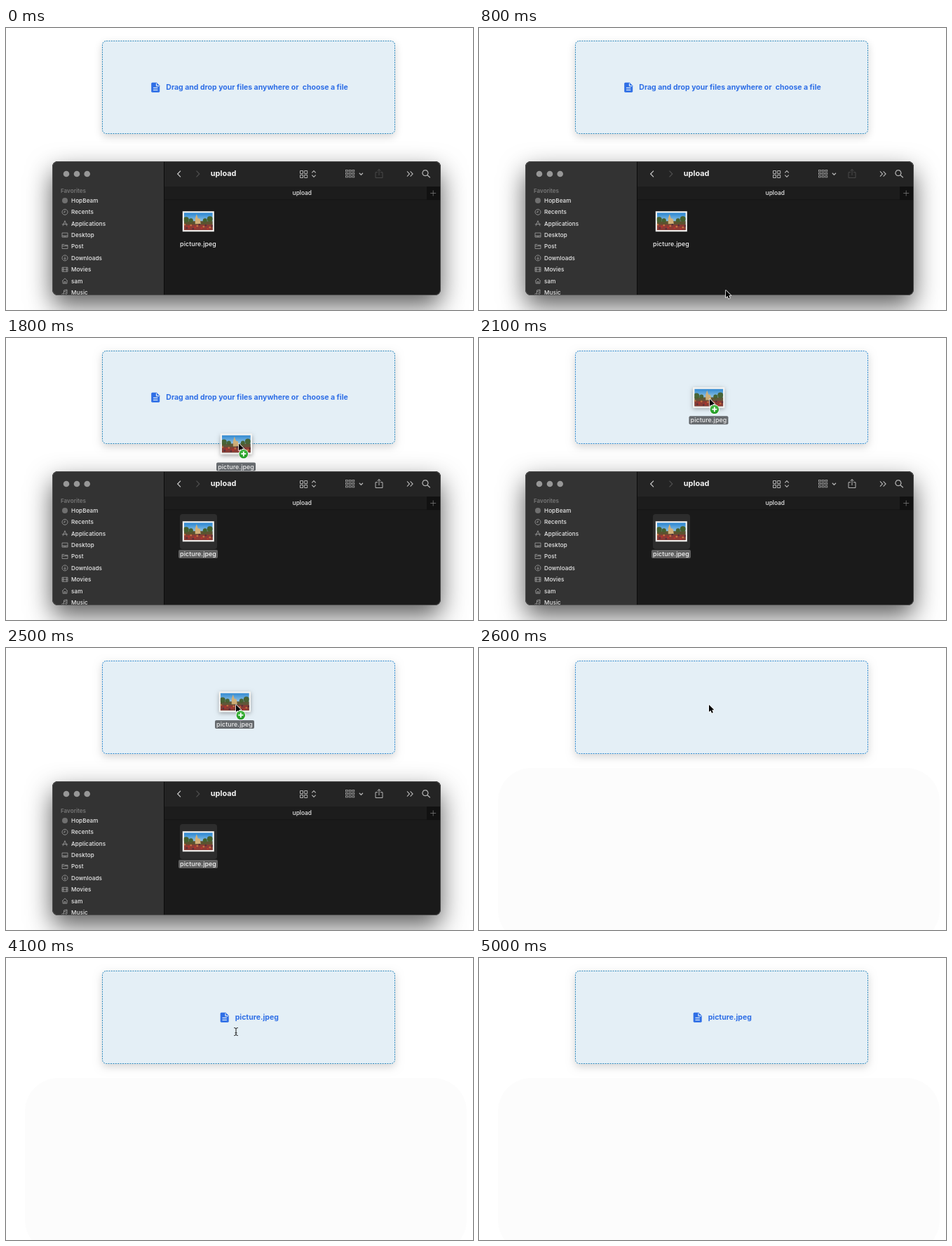
Recreate the animation shown at these times as an HTML page with a canvas. Size 666 by 402 pixels, loop 6100 ms.

```html
<!DOCTYPE html>
<html lang="en">
<head>
<meta charset="utf-8">
<title>Drag and drop upload</title>
<style>
html, body { margin: 0; width: 100%; height: 100%; overflow: hidden; background: #fff; }
canvas { display: block; width: 666px; height: 402px; }
</style>
</head>
<body>
<canvas id="stage"></canvas>
<script>
const W = 666, H = 402, LOOP = 6100, STEP = 100;
const FONT = 'Inter, Roboto, sans-serif';
const BLUE = '#2f6fe6';
const GRAB = [276, 280];
const GHOST_LAG = 15;
const canvas = document.getElementById('stage');
const c = canvas.getContext('2d');
const ratio = window.devicePixelRatio || 1;
canvas.width = W * ratio;
canvas.height = H * ratio;

// Pointer tip over time: [ms, x, y]
const ENTER = [[800, 352, 374], [900, 330, 346], [1000, 304, 312], [1100, 285, 289], [1200, ...GRAB]];
const DRAG = [[1400, ...GRAB], [1500, 282, 261], [1600, 299, 223], [1700, 319, 183], [1800, 332, 150.5],
  [1900, 334, 122], [2000, 332, 102], [2100, 329, 87], [2200, 328, 81]];
const LEAVE = [[4100, 328, 105], [4200, 345, 175], [4300, 373, 250], [4400, 400, 291], [4800, 400, 291], [4900, 408, 349]];
const PATH = [...ENTER, ...DRAG, [4000, 328, 81], ...LEAVE];

function pointerAt(t) {
  let i = PATH.findIndex(p => p[0] > t);
  if (i < 0) i = PATH.length - 1;
  const [t0, x0, y0] = PATH[i - 1], [t1, x1, y1] = PATH[i];
  const k = Math.min(1, (t - t0) / (t1 - t0));
  return [x0 + (x1 - x0) * k, y0 + (y1 - y0) * k];
}

function rect(x, y, w, h, fill, r = 0) {
  c.beginPath();
  c.roundRect(x, y, w, h, r);
  c.fillStyle = fill;
  c.fill();
}

function disc(x, y, r, fill) {
  c.beginPath();
  c.arc(x, y, r, 0, Math.PI * 2);
  c.fillStyle = fill;
  c.fill();
}

function poly(points, fill) {
  c.beginPath();
  for (let i = 0; i < points.length; i += 2) c.lineTo(points[i], points[i + 1]);
  c.closePath();
  c.fillStyle = fill;
  c.fill();
}

function stroke(d, color, width = 1) {
  c.strokeStyle = color;
  c.lineWidth = width;
  c.stroke(new Path2D(d));
}

function text(s, x, y, size, weight, color, align = 'left', spacing = 0) {
  c.font = `${weight} ${size}px ${FONT}`;
  c.letterSpacing = spacing + 'px';
  c.textAlign = align;
  c.textBaseline = 'alphabetic';
  c.fillStyle = color;
  c.fillText(s, x, y);
}

function shadow(color, blur, dy) {
  c.shadowColor = color;
  c.shadowBlur = blur * ratio;
  c.shadowOffsetY = dy * ratio;
}

function docIcon(x) {
  c.save();
  c.translate(x, 77.7);
  c.fillStyle = BLUE;
  c.fill(new Path2D('M1.5 0H7.6L12 4.5V12.6Q12 14 10.6 14H1.4Q0 14 0 12.6V1.5Q0 0 1.5 0Z'));
  stroke('M7.3 1V5H11.2M2.8 7.7H9.2M2.8 10.6H9.2', '#e4eff6', 1.2);
  c.restore();
}

function dropZone(t) {
  c.save();
  shadow('rgba(0,0,0,.17)', 12, 4);
  rect(137, 18, 418, 133, '#e4eff6', 6);
  c.restore();
  c.save();
  c.setLineDash([2, 1.4]);
  c.beginPath();
  c.roundRect(137.5, 18.5, 417, 132, 5.5);
  c.strokeStyle = t >= 1900 && t < 2700 ? '#2f8ad0' : '#2f89bd';
  c.lineWidth = 1;
  c.stroke();
  c.restore();
  if (t < 1900) {
    docIcon(207.2);
    text('Drag and drop your files anywhere or', 228.3, 88.2, 10.5, 700, BLUE);
    text('choose a file', 422.8, 88.2, 10.5, 700, BLUE);
  } else if (t >= 2700) {
    docIcon(305.7);
    text('picture.jpeg', 326.7, 88.2, 10.5, 700, BLUE);
  }
}

// Flat landscape thumbnail, centred on x, y
function thumb(x, y) {
  c.save();
  c.translate(x - 22.5, y - 14.5);
  rect(0, 0, 45, 29, '#f4f4f2');
  c.beginPath();
  c.rect(2, 2, 41, 25);
  c.clip();
  const sky = c.createLinearGradient(0, 2, 0, 16);
  sky.addColorStop(0, '#2583d0');
  sky.addColorStop(1, '#9ccbe6');
  rect(2, 2, 41, 25, sky);
  rect(2, 14, 41, 13, '#5d5230');
  poly([18, 18, 18, 10, 20, 4, 22, 10, 25, 11, 26, 18], '#d3b078');
  for (const [px, py, r] of [[5, 12, 4], [12, 13, 3], [32, 13, 3], [39, 11, 4]]) disc(px, py, r, '#46602f');
  rect(2, 19, 41, 8, '#8c3b35');
  for (let i = 0; i < 14; i++) disc(3 + i * 3, 19 + (i * 5) % 7, 1.3, ['#c9743f', '#54303c', '#b8332f'][i % 3]);
  c.restore();
}

function fileLabel(x, y, boxed, color = '#606060') {
  if (boxed) rect(x - 28, y - 6, 56, 12, color, 2);
  text('picture.jpeg', x, y + 3.2, 8.9, 500, '#f2f2f2', 'center', .08);
}

const ITEMS = [
  ['HopBeam', ''],
  ['Recents', 'M0 -4A4 4 0 1 1 -.01 -4M0 -2.3V.3H-2'],
  ['Applications', 'M0 -4L3 3.5M0 -4L-3 3.5M-4.2 1H4.2'],
  ['Desktop', 'M-4 -3H4V3H-4ZM-4 1H4M-2 2H2'],
  ['Post', 'M-4 3V-3H-1L0 -2H4V3ZM-4 -.7H4'],
  ['Downloads', 'M0 -4A4 4 0 1 1 -.01 -4M0 -2V2M-1.7 .4L0 2L1.7 .4'],
  ['Movies', 'M-4 -3H4V3H-4ZM-2.3 -3V3M2.3 -3V3M-4 0H4'],
  ['sam', 'M-4 .2L0 -3.7L4 .2M-3 -.5V3.5H3V-.5M-1 3.5V1H1V3.5'],
  ['Music', 'M-1.5 2.7V-3L3 -4V1.7M-1.5 -1.2L3 -2.2M-1.5 2.7A1.3 1.1 0 1 1 -1.6 2M3 1.7A1.3 1.1 0 1 1 2.9 1']
];

function sidebar() {
  rect(66, 190, 159, 191, '#333');
  for (const x of [86, 101, 115.7]) disc(x, 208, 4.3, '#979797');
  text('Favorites', 78, 235.3, 8.1, 600, '#777');
  ITEMS.forEach(([name, icon], i) => {
    const y = 246 + i * 16.37;
    c.save();
    c.translate(84, y);
    if (icon) stroke(icon, '#a0a0a0', .8);
    else disc(0, 0, 4, '#707070');
    c.restore();
    text(name, 93, y + 3, 8.1, 500, '#ececec', 'left', .1);
  });
}

function toolbar(selected) {
  const gray = '#b4b4b4';
  rect(226, 190, 394, 36, '#242424');
  rect(226, 226, 394, 19, '#1c1c1c');
  rect(600, 226, 20, 19, '#111');
  rect(226, 244.5, 394, .7, '#111');
  stroke('M249 203.7L244.7 208L249 212.3', '#c8c8c8', 1.2);
  stroke('M271.5 203.7L275.8 208L271.5 212.3', '#505050', 1.1);
  text('upload', 291.8, 211.3, 10.9, 700, '#f2f2f2');
  text('upload', 422.3, 238, 8.4, 500, '#e8e8e8', 'center');
  stroke('M419.5 203.5h4v4h-4zM425.7 203.5h4v4h-4zM419.5 209.5h4v4h-4zM425.7 209.5h4v4h-4z', gray);
  stroke('M436.3 206.3L439 203.5L441.7 206.3M436.3 209.7L439 212.5L441.7 209.7', gray, 1.1);
  c.lineWidth = .7;
  for (const y of [202.5, 206.6, 210.7]) {
    for (let i = 0; i < 3; i++) c.strokeRect(484.4 + i * 4.7, y, 3, 2.2);
  }
  stroke('M503.8 206.8L506.4 209.3L509 206.8', gray, 1.2);
  stroke('M530 205.7H527V213.5H537V205.7H534M532 210V201.5M529.6 203.8L532 201.4L534.4 203.8',
    selected ? gray : '#484848');
  stroke('M572 204.3L575.5 208L572 211.7M576.6 204.3L580.1 208L576.6 211.7', gray, 1.1);
  stroke('M598 202.7A4 4 0 1 1 597.9 202.7M601 209.8L604.8 213.3', gray, 1.2);
  stroke('M605.2 235.5H613.2M609.2 231.5V239.5', '#777', .8);
}

function fileWindow(t) {
  const selected = t >= 1300;
  c.save();
  shadow('rgba(0,0,0,.64)', 36, 15);
  rect(66, 190, 554, 191, '#1a1a1a', 8);
  c.restore();
  c.save();
  c.beginPath();
  c.roundRect(66, 190, 554, 191, 8);
  c.clip();
  sidebar();
  rect(225, 190, 1, 191, '#0c0c0c');
  toolbar(selected);
  if (selected) rect(248, 251, 53, 50, '#2d2d2d', 4);
  thumb(274.3, 275.7);
  fileLabel(274, 308, selected);
  c.restore();
  c.beginPath();
  c.roundRect(66.5, 190.5, 553, 190, 7.5);
  c.strokeStyle = '#555';
  c.lineWidth = .8;
  c.stroke();
}

function arrow(x, y) {
  c.save();
  c.translate(x, y);
  const p = new Path2D('M0 0V10L2.4 7.9L4 11.7L5.8 10.9L4.2 7.2H7.3Z');
  c.lineJoin = 'round';
  c.strokeStyle = '#fff';
  c.lineWidth = 1.5;
  c.stroke(p);
  c.fillStyle = '#000';
  c.fill(p);
  c.restore();
}

function caret(x, y) {
  c.save();
  c.translate(x, y);
  stroke('M-2.8 -5.5Q0 -5.5 0 -4Q0 -5.5 2.8 -5.5M0 -4.5V4.5M-2.8 5.5Q0 5.5 0 4Q0 5.5 2.8 5.5M-1.5 1.8H1.5', '#222', 1);
  c.restore();
}

function ghost(x, y) {
  c.save();
  c.translate(x - GRAB[0], y - GRAB[1]);
  c.globalAlpha = .95;
  c.save();
  shadow('rgba(0,0,0,.35)', 6, 2);
  rect(251.8, 261.2, 45, 29, '#f4f4f2');
  c.restore();
  thumb(274.3, 275.7);
  fileLabel(274, 308, true, '#5f6468');
  c.restore();
}

function badge(x, y) {
  disc(x, y, 7, '#fff');
  const green = c.createLinearGradient(0, y - 6, 0, y + 6);
  green.addColorStop(0, '#48b944');
  green.addColorStop(1, '#1f9a22');
  disc(x, y, 6.3, green);
  stroke(`M${x - 3.5} ${y}h7M${x} ${y - 3.5}v7`, '#fff', 1.8);
}

function pointer(t) {
  if (t < 800 || t >= 5000) return;
  const [x, y] = pointerAt(t);
  const dragging = t >= 1500 && t < 2600;
  if (dragging) ghost(...pointerAt(t - GHOST_LAG));
  if (t === 4100) caret(x, y);
  else arrow(x, y);
  if (dragging && t >= 1700) badge(x + 6.8, y + 14.7);
}

function draw(t) {
  c.setTransform(ratio, 0, 0, ratio, 0, 0);
  rect(0, 0, W, H, '#fff');
  if (t >= 2600) rect(27, 171, 630, 250, '#fcfcfc', 48);
  dropZone(t);
  if (t < 2600) fileWindow(t);
  pointer(t);
}

let start = null, last = -1;
function tick() {
  const now = performance.now();
  if (start === null) start = now;
  const t = Math.floor(((now - start) % LOOP) / STEP) * STEP;
  if (t !== last) draw(last = t);
  requestAnimationFrame(tick);
}
tick();
</script>
</body>
</html>
```
